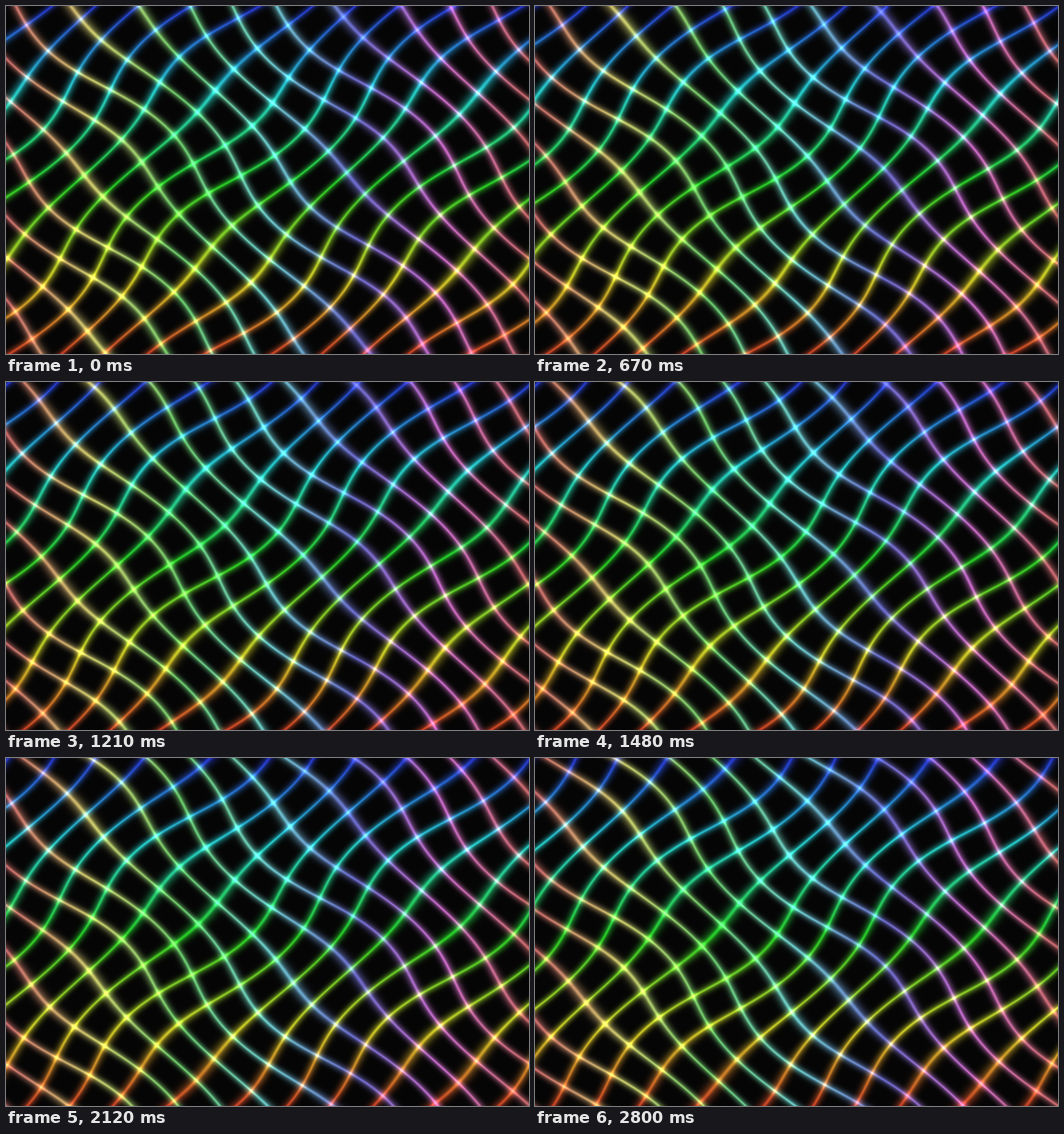
An HTML page with a canvas that plays this animation: 562x374 px, repeating every 2900 ms.

```html
<!DOCTYPE html>
<html lang="en">
<head>
<meta charset="utf-8">
<title>Neon lattice</title>
<style>
html, body { margin: 0; width: 100%; height: 100%; overflow: hidden; background: #050505; }
canvas { display: block; }
</style>
</head>
<body>
<canvas id="stage" width="562" height="374"></canvas>
<script>
const W = 562, H = 374, LOOP = 2900;
const UNIT = W / 10;               // spacing of the lines along x or y
const PITCH = UNIT / Math.SQRT2;   // spacing across the lines
const SWAY = 0.205;
const STEPS = [0, 120, 240, 380, 510, 670, 820, 970, 1090, 1210, 1360, 1480,
  1600, 1720, 1870, 1990, 2120, 2270, 2400, 2550, 2680, 2800];

const ctx = document.getElementById('stage').getContext('2d');
const image = ctx.createImageData(W, H);
const px = image.data;

function hsl(h, s, l) {
  const a = s * Math.min(l, 1 - l);
  return [0, 8, 4].map(n => {
    const k = (n + h / 30) % 12;
    return 255 * (l - a * Math.max(-1, Math.min(k - 3, 9 - k, 1)));
  });
}

const range = (n, f) => Array.from({ length: n }, (_, i) => f(i));
const fallTint = range(W, x => hsl(360 * x / W, 0.5, 0.61));
const riseTint = range(H, y => hsl(10 + 224 * (1 - y / H), 0.72, 0.47));

// Brightness of a line at phase u: a thin core inside a soft glow
function glow(u) {
  const d = Math.abs(u - Math.round(u)) * PITCH;
  if (d > 15) return 0;
  return 0.48 * Math.exp(-d * d / 2.2) + 0.5 * Math.exp(-d * d / 25);
}

function draw(t) {
  // Lattice units, counted from the lower left corner
  const dx = range(H, y => SWAY * Math.sin(2 * (H - y) / UNIT + t));
  const dy = range(W, x => SWAY * Math.sin(1.3 * x / UNIT + 0.34 * t));
  let i = 0;
  for (let y = 0; y < H; y++) {
    const rise = riseTint[y];
    for (let x = 0; x < W; x++) {
      const gx = x / UNIT + dx[y];
      const gy = (H - y) / UNIT + dy[x];
      const a = glow(gx + gy), b = glow(gx - gy), fall = fallTint[x];
      for (let c = 0; c < 3; c++) px[i++] = 5 + a * fall[c] + b * rise[c];
      px[i++] = 255;
    }
  }
  ctx.putImageData(image, 0, 0);
}

const start = performance.now();
let shown = -1;

function tick() {
  const now = (performance.now() - start) % LOOP;
  const step = STEPS.findLast(s => s <= now);
  if (step !== shown) draw(2.5 + (shown = step) / 1000);
  requestAnimationFrame(tick);
}
tick();
</script>
</body>
</html>
```
